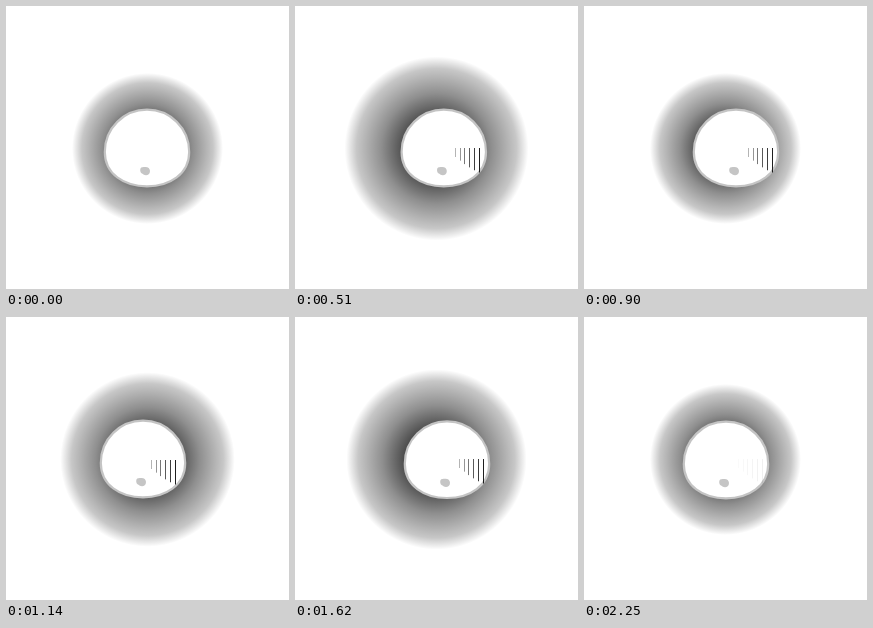
An HTML page that plays this animation: 283 px wide and 283 px high, repeating every 2310 ms.

```html
<!DOCTYPE html>
<html lang="en">
<head>
<meta charset="utf-8">
<title>Glowing pebble</title>
<style>
html, body { margin: 0; width: 100%; height: 100%; overflow: hidden; background: #fff; }
svg { display: block; width: 100%; height: 100%; }
</style>
</head>
<body>
<svg viewBox="0 0 283 283">
  <defs>
    <radialGradient id="shade">
      <stop offset=".3" stop-opacity=".76"/>
      <stop offset=".6" stop-opacity=".44"/>
      <stop offset=".87" stop-opacity=".22"/>
      <stop offset="1" stop-opacity="0"/>
    </radialGradient>
  </defs>
  <circle id="glow" cx="141.5" cy="142.5" r="75" fill="url(#shade)"/>
  <g id="body">
    <path d="M-42.2 146C-42.2 122-23 103.7 0 103.7S42.2 122 42.2 146C42.2 168 23 180.3 0 180.3S-42.2 168-42.2 146Z"
      fill="#fff" stroke="#c4c4c4" stroke-width="2.2"/>
    <path d="M-6.8 164C-6.8 161-4.5 160.8-2 161C1 160.8 3 162.5 3 165C3 168 1 169.3-1 169.3C-3 169.3-3.5 168.2-4.5 167.8C-6 167.2-6.8 166-6.8 164Z"
      fill="#c5c5c5"/>
  </g>
  <g id="bars"></g>
</svg>
<script>
const LOOP = 2310, STEP = 30, BARS = 6;
const $ = id => document.getElementById(id);
const glow = $('glow'), body = $('body'), bars = $('bars');

// Cosine ease from 0 to 1 between times a and b
function ease(t, a, b) {
  const p = Math.min(1, Math.max(0, (t - a) / (b - a)));
  return (1 - Math.cos(Math.PI * p)) / 2;
}
// Rise from a to its peak, then fall until b
const pulse = (t, a, peak, b) => ease(t, a, peak) - ease(t, peak, b);

function move(el, x, y) {
  el.setAttribute('transform', `translate(${x} ${y})`);
}

// Bars run leftwards from the tallest and darkest
for (let k = 0; k < BARS; k++) {
  const bar = document.createElementNS('http://www.w3.org/2000/svg', 'rect');
  const grey = 30 + 30 * k;
  const attrs = {
    x: -Math.round(4.87 * k), y: 142, width: 1,
    height: 24.5 - 15.5 * (k / (BARS - 1)) ** 1.2,
    fill: `rgb(${grey},${grey},${grey})`
  };
  for (const name in attrs) bar.setAttribute(name, attrs[name]);
  bars.append(bar);
}

function draw(ms) {
  const t = Math.floor(ms % LOOP / STEP) * STEP;
  const swing = pulse(t, 900, 1140, 1440);
  const x = 141 + 11 * ease(t, 0, 800) - 15 * swing - 10 * ease(t, 1770, 2130);
  const y = 2 * ease(t, 1500, 1800) - ease(t, 1800, 2130);

  glow.setAttribute('r', 75.5 + 18 * pulse(t, 0, 420, 900) + 23.5 * pulse(t, 900, 1380, 1950));
  move(body, x, y);
  move(bars, Math.floor(x + 36 - 4 * swing), Math.round(pulse(t, 900, 1290, 1800)));
  bars.setAttribute('opacity', ease(t, 0, 300) * (1 - .94 * ease(t, 1860, 2250)));
}

const start = performance.now();
function tick() {
  draw(performance.now() - start);
  requestAnimationFrame(tick);
}
tick();
</script>
</body>
</html>
```
